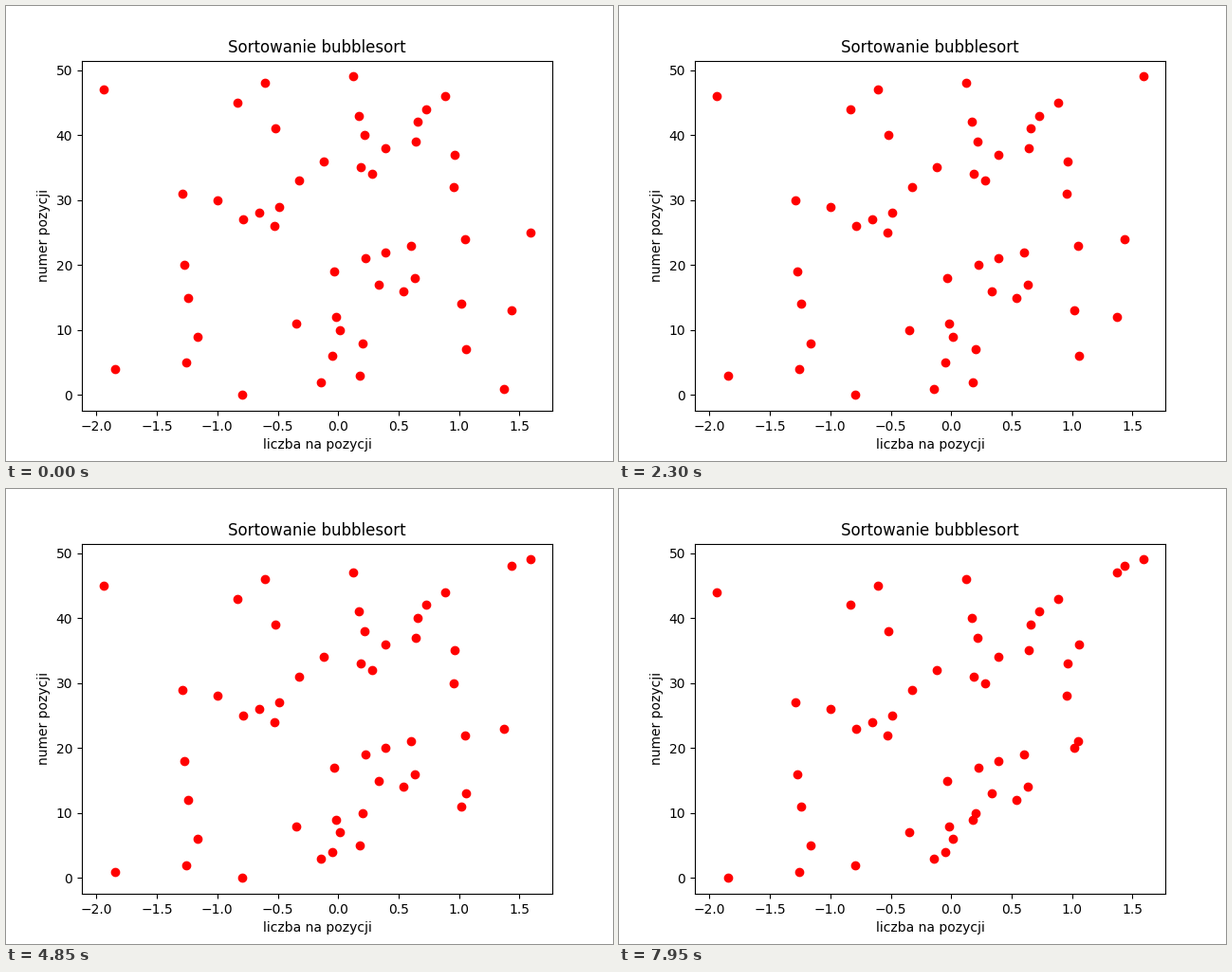
A matplotlib script for the animation above (8000 ms loop, 640 px wide and 480 px high).

```python
import numpy as np
import matplotlib.pyplot as plt
from matplotlib.animation import FuncAnimation

FRAMES = 160
INTERVAL = 50
ZERO_PX, UNIT_PX = 350.2, 127.4  # pixel of x = 0 and pixels per unit

# unsorted numbers, given by their horizontal pixel
START = [
    249, 525, 332, 373, 115, 190, 344, 485, 376, 202,
    352, 306, 348, 533, 480, 192, 419, 393, 431, 346,
    188, 379, 400, 427, 484, 553, 283, 250, 267, 288,
    223, 186, 472, 309, 386, 374, 335, 473, 400, 432,
    378, 284, 434, 372, 443, 244, 463, 103, 273, 366,
]


def to_data(px):
    return (np.asarray(px) - ZERO_PX) / UNIT_PX


def bubble_states(values):
    """Yield the list at the start and after every swap."""
    a = list(values)
    yield a[:]
    for end in range(len(a) - 1, 0, -1):
        for i in range(end):
            if a[i] > a[i + 1]:
                a[i], a[i + 1] = a[i + 1], a[i]
                yield a[:]


states = [to_data(s) for s, _ in zip(bubble_states(START), range(FRAMES))]
rows = np.arange(len(START))

plt.rcParams["font.family"] = "DejaVu Sans"
fig, ax = plt.subplots(figsize=(6.4, 4.8), dpi=100)
dots, = ax.plot(states[0], rows, "ro")
ax.set_xlim(to_data(80), to_data(576))
ax.set_ylim(-2.45, 51.45)
ax.set_title("Sortowanie bubblesort")
ax.set_xlabel("liczba na pozycji")
ax.set_ylabel("numer pozycji")


def update(frame):
    dots.set_data(states[frame], rows)
    return dots,


anim = FuncAnimation(fig, update, frames=FRAMES, interval=INTERVAL,
                     init_func=lambda: update(0), repeat=True, repeat_delay=0)
plt.show()
```
